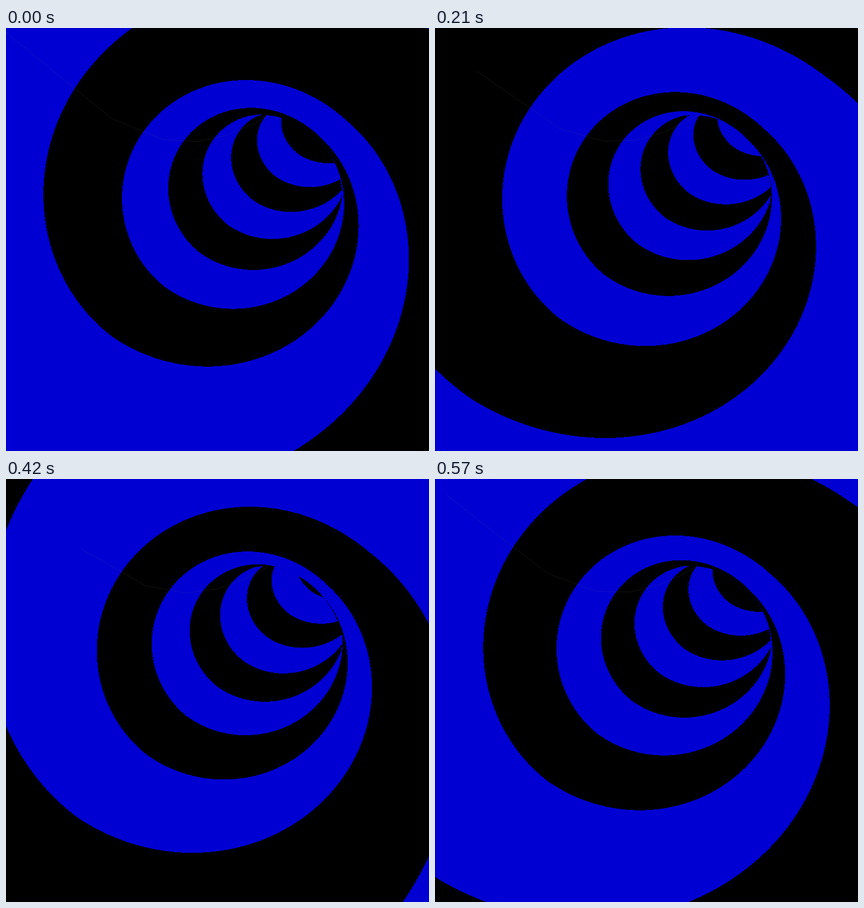
Write an HTML page with a canvas that moves like this. It is 748 px wide and 748 px high and loops after 0.6 s.

```html
<!DOCTYPE html>
<html lang="en">
<head>
<meta charset="utf-8">
<title>Spiral tunnel</title>
<style>
  html, body { margin: 0; width: 100%; height: 100%; overflow: hidden; background: #000; }
  canvas { display: block; width: 748px; height: 748px; }
</style>
</head>
<body>
<canvas id="stage" width="748" height="748"></canvas>
<script>
const SIZE = 748, HALF = SIZE / 2;
const LOOP = 600, STEP = 30, BAND = LOOP / 2, POSES = BAND / STEP;

// Camera inside a ring of straight tube segments (tube radius 1),
// bending to the upper right. Each segment is one stripe long.
const FOCAL = 903;
const RING = 15.4;      // major radius
const SIDE = -0.071;    // camera offset towards the bend
const TILT = 0.1045;    // camera turn towards the bend
const ARC = 0.0988;     // angle of one segment
const START = 1.863;    // segments from the camera to stripe level 0
const JOINT = 0.1;      // first joint at time 0, in segments
const COS = Math.cos(TILT), SIN = Math.sin(TILT);

const ctx = document.getElementById('stage').getContext('2d');
const image = ctx.createImageData(SIZE, SIZE);
const pixels = new Uint32Array(image.data.buffer);
const BLACK = 0xff000000, BLUE = 0xffd30000; // ABGR

// Tube segments ahead of the camera, as scaled middle direction and far plane.
function makeSegments(shift) {
  const list = [];
  const scale = 1 / Math.cos(ARC / 2);
  for (let k = -1; k < 24; k++) {
    const from = (k + JOINT - shift) * ARC;
    const to = from + ARC, mid = from + ARC / 2;
    if (to > 0) {
      list.push({
        mx: -Math.cos(mid) * scale, mz: Math.sin(mid) * scale,
        fx: Math.sin(to), fz: Math.cos(to)
      });
    }
  }
  return list;
}

// Stripe phase of the wall point seen along a view ray.
function wallPhase(u, v, segments) {
  const dx = u * COS + FOCAL * SIN;
  const dz = FOCAL * COS - u * SIN;
  const x0 = SIDE - RING;
  for (const s of segments) {
    const a = x0 * s.mx - RING;
    const b = dx * s.mx + dz * s.mz;
    const q = b * b + v * v;
    const disc = a * a * b * b - q * (a * a - 1);
    if (disc < 0) continue;
    const t = (Math.sqrt(disc) - a * b) / q;
    const x = x0 + t * dx, z = t * dz;
    if (x * s.fx + z * s.fz > 0) continue;
    const depth = Math.atan2(z, -x) / ARC - START;
    const around = Math.atan2(t * v, -(a + b * t)) / Math.PI;
    return depth - around + 0.75;
  }
  return 0;
}

// Stripe parity of every pixel; it inverts after each BAND.
function makePose(shift) {
  const segments = makeSegments(shift);
  const odd = new Uint8Array(SIZE * SIZE);
  for (let row = 0, i = 0; row < SIZE; row++) {
    for (let col = 0; col < SIZE; col++, i++) {
      const x = col + 0.5 - HALF, y = row + 0.5 - HALF;
      const u = (x - y) * Math.SQRT1_2, v = (-x - y) * Math.SQRT1_2;
      odd[i] = Math.floor(wallPhase(u, v, segments) + shift + 20) & 1;
    }
  }
  return odd;
}

// Screen place of the texture seam at a distance in segments.
function seamPoint(s) {
  const a = s * ARC;
  const x = RING * (1 - Math.cos(a)) - SIDE, z = RING * Math.sin(a);
  const k = FOCAL / (x * SIN + z * COS);
  const u = k * (x * COS - z * SIN), v = k;
  return [HALF + (u - v) * Math.SQRT1_2, HALF - (u + v) * Math.SQRT1_2];
}

function drawSeam(shift) {
  const end = 6.8, stops = [end];
  for (let n = 8; n > 0; n--) {
    const s = n + JOINT - shift;
    if (s > 1.05 && s < end) stops.push(s);
  }
  ctx.beginPath();
  stops.forEach(s => ctx.lineTo(...seamPoint(s)));
  ctx.lineWidth = 0.8;
  ctx.setLineDash([1, 2]);
  ctx.strokeStyle = 'rgba(120,120,105,0.6)';
  ctx.stroke();
}

const poses = [];
for (let p = 0; p < POSES; p++) poses.push(makePose(p / POSES));

function draw(time) {
  const step = Math.floor(time % LOOP / STEP);
  const p = step % POSES, flip = step < POSES ? 0 : 1;
  const odd = poses[p];
  for (let i = 0; i < pixels.length; i++) {
    pixels[i] = odd[i] ^ flip ? BLUE : BLACK;
  }
  ctx.putImageData(image, 0, 0);
  drawSeam(p / POSES);
}

let begin;
function tick(now) {
  if (begin === undefined) begin = now;
  draw(Math.max(0, now - begin));
  requestAnimationFrame(tick);
}
draw(0);
requestAnimationFrame(tick);
</script>
</body>
</html>
```
